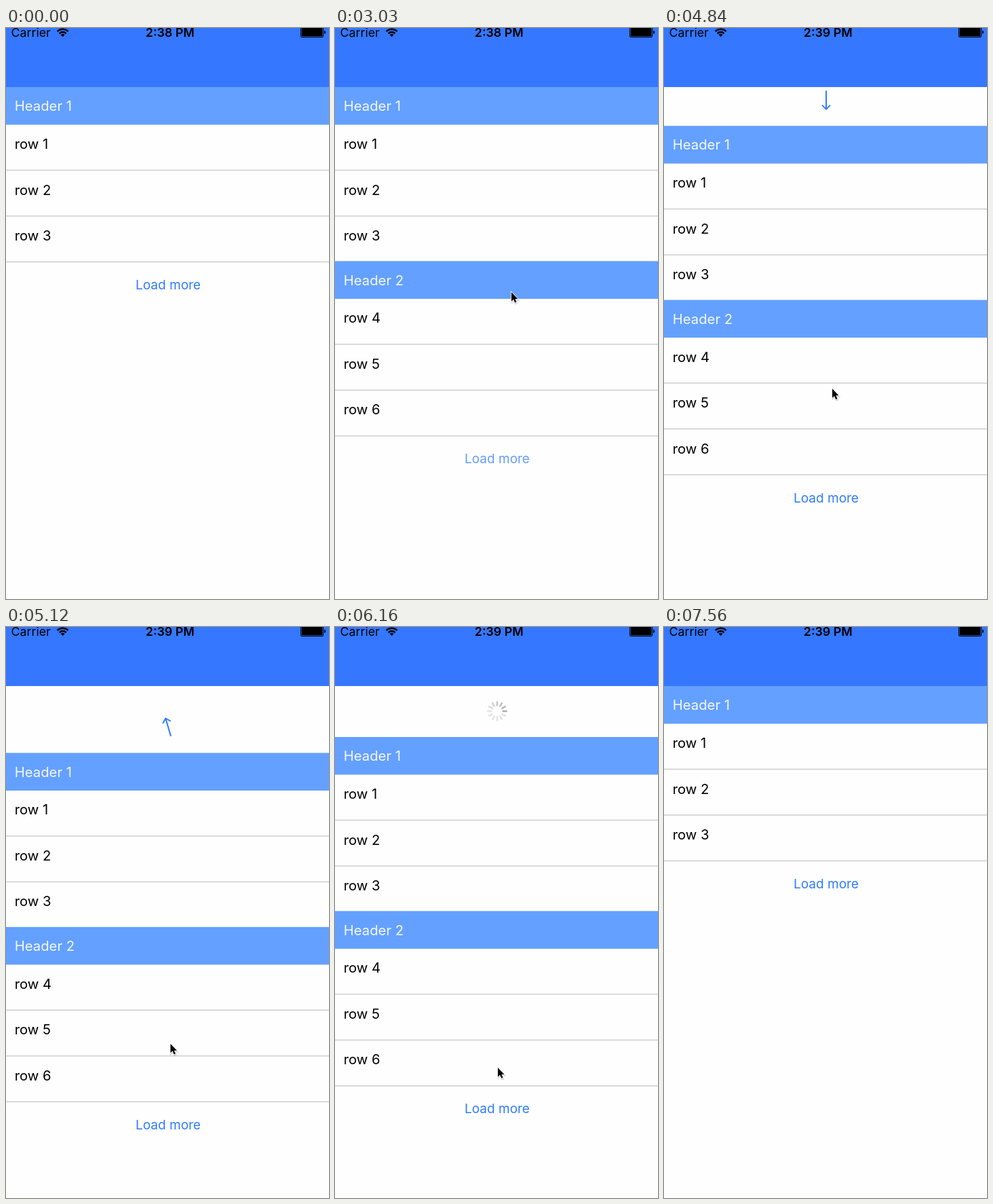
These frames come from a looping animation (476x841 px, 8.52 s). An HTML page:

```html
<!DOCTYPE html>
<html lang="en">
<head>
<meta charset="utf-8">
<title>Pull to refresh list</title>
<style>
  html, body { margin: 0; width: 100%; height: 100%; overflow: hidden; background: #fefefe; }
  svg { display: block; width: 100%; height: 100%; }
  text { font-family: Inter, Roboto, sans-serif; font-size: 20.3px; }
  .more { font-size: 19px; fill: #2f7bff; text-anchor: middle; }
  .bar { font-size: 17.8px; }
</style>
</head>
<body>
<svg viewBox="0 0 476 841">
  <rect width="476" height="841" fill="#fefefe"/>
  <g id="arrow" fill="none" stroke="#2f7bff" stroke-width="2">
    <path d="M0-14V13M-6 7.5L0 13.5L6 7.5"/>
  </g>
  <g id="list">
    <g id="groups"></g>
    <text id="more" class="more" x="239">Load more</text>
  </g>
  <g id="spinner" stroke-width="2.7" stroke-linecap="round"></g>
  <rect width="476" height="87" fill="#3577ff"/>
  <text class="bar" x="7.6" y="13">Carrier</text>
  <g fill="none" stroke="#000" stroke-width="2.4">
    <path d="M75.6 5A11.3 11.3 0 0 1 91.6 5M78.6 8.1A7 7 0 0 1 88.6 8.1"/>
    <path d="M83.6 13L80.6 10A4.2 4.2 0 0 1 86.6 10Z" fill="#000" stroke="none"/>
  </g>
  <text id="clock" class="bar" x="241.7" y="13" font-weight="600" text-anchor="middle"></text>
  <rect x="434.5" y="-1.5" width="33" height="15" rx="1.5" fill="none" stroke="#000"/>
  <rect x="435.7" y="0" width="30.6" height="12.3"/>
  <path d="M469 3.5Q471 4 471 6.2T469 9Z"/>
  <g id="cursor">
    <path d="M0 0V13.4L3 10.7L5.2 15.6L7.5 14.6L5.4 9.9H9.5Z" transform="translate(.6 1.6)"
          stroke="#000" stroke-width="2" opacity=".16"/>
    <path d="M0 0V13.4L3 10.7L5.2 15.6L7.5 14.6L5.4 9.9H9.5Z"
          stroke="#fff" stroke-width="1.6" paint-order="stroke"/>
  </g>
</svg>
<script>
const LOOP = 8520, GROUP = 256.4, ROW = 67.5, SPOKES = 12;
const $ = id => document.getElementById(id);
const show = (el, on) => el.setAttribute('display', on ? 'inline' : 'none');
const move = (el, x, y, extra = '') =>
  el.setAttribute('transform', `translate(${x} ${y}) ${extra}`);

const linear = p => p;
const easeIn = p => p * p;
const easeOut = p => 1 - (1 - p) ** 2;
const easeBoth = p => (1 - Math.cos(Math.PI * p)) / 2;

// Keys are [time, values, easing towards this key].
function track(keys, t) {
  let a = keys[0];
  if (t <= a[0]) return a[1];
  for (const b of keys.slice(1)) {
    if (t < b[0]) {
      const p = (b[2] || linear)((t - a[0]) / (b[0] - a[0]));
      return a[1].map((v, i) => v + (b[1][i] - v) * p);
    }
    a = b;
  }
  return a[1];
}

const pull = [
  [4380, [0]], [4840, [57]], [5240, [116]],
  [5605, [116]], [5905, [75], easeBoth],
  [6570, [75]], [6910, [0], easeBoth]
];
const pointer = [
  [720, [271, 804]], [1550, [260, 389], easeOut],
  [4169, [260, 389]], [4170, [261, 387]], [4230, [261, 386]],
  [4340, [261, 386]], [4840, [248, 531]], [5240, [240, 649]],
  [7150, [240, 649]], [7560, [260, 845], easeIn]
];

function groupMarkup(n) {
  const top = 87 + n * GROUP;
  let s = `<rect y="${top}" width="476" height="55.5" fill="#64a0ff"/>
    <text x="12.7" y="${top + 35.3}" fill="#fff" fill-opacity=".93">Header ${n + 1}</text>`;
  for (let i = 0; i < 3; i++) {
    s += `<text x="12.7" y="${top + 91 + i * ROW}">row ${n * 3 + i + 1}</text>
      <rect y="${top + 121.8 + i * ROW}" width="476" height="1.3" fill="#c8c8c8"/>`;
  }
  return `<g>${s}</g>`;
}
$('groups').innerHTML = groupMarkup(0) + groupMarkup(1);
const second = $('groups').children[1];

$('spinner').innerHTML = Array.from({ length: SPOKES }, (_, i) =>
  `<path d="M0-8.6V-13.6" transform="rotate(${i * 360 / SPOKES})"/>`).join('');
const spokes = [...$('spinner').children];

function drawSpinner(t, y) {
  move($('spinner'), 239, y);
  const head = Math.floor((t - 5680) * SPOKES / 1000) + 10;
  spokes.forEach((el, i) => {
    const age = (((head - i) % SPOKES) + SPOKES) % SPOKES;
    const c = Math.round(176 + 52 * Math.min(1, age / 6));
    el.setAttribute('stroke', `rgb(${c},${c},${c})`);
  });
}

function draw(t) {
  const [offset] = track(pull, t);
  const [cx, cy] = track(pointer, t);
  const full = t >= 2860 && t < 6510;
  const loading = t >= 2060 && t < 2860;
  const refreshing = t >= 5600 && t < 6510;

  move($('list'), 0, offset);
  show(second, full);
  show($('more'), !loading);
  $('more').setAttribute('y', 385 + (full ? GROUP : 0));
  $('more').setAttribute('opacity', track([
    [1940, [1]], [2060, [0.25]], [2800, [0.25]], [3150, [1]]
  ], t)[0]);

  const [turn] = track([[4960, [0]], [5160, [180], easeBoth], [5600, [180]], [5601, [0]]], t);
  move($('arrow'), 239, 49 + offset, `rotate(${turn})`);
  show($('arrow'), !refreshing);

  show($('spinner'), loading || refreshing);
  drawSpinner(t, loading ? 378 : 49 + offset);

  $('clock').textContent = t < 4620 ? '2:38 PM' : '2:39 PM';
  show($('cursor'), t >= 720 && t < 7560);
  move($('cursor'), cx, cy);
}

const start = performance.now();
function tick() {
  draw((performance.now() - start) % LOOP);
  requestAnimationFrame(tick);
}
tick();
</script>
</body>
</html>
```
